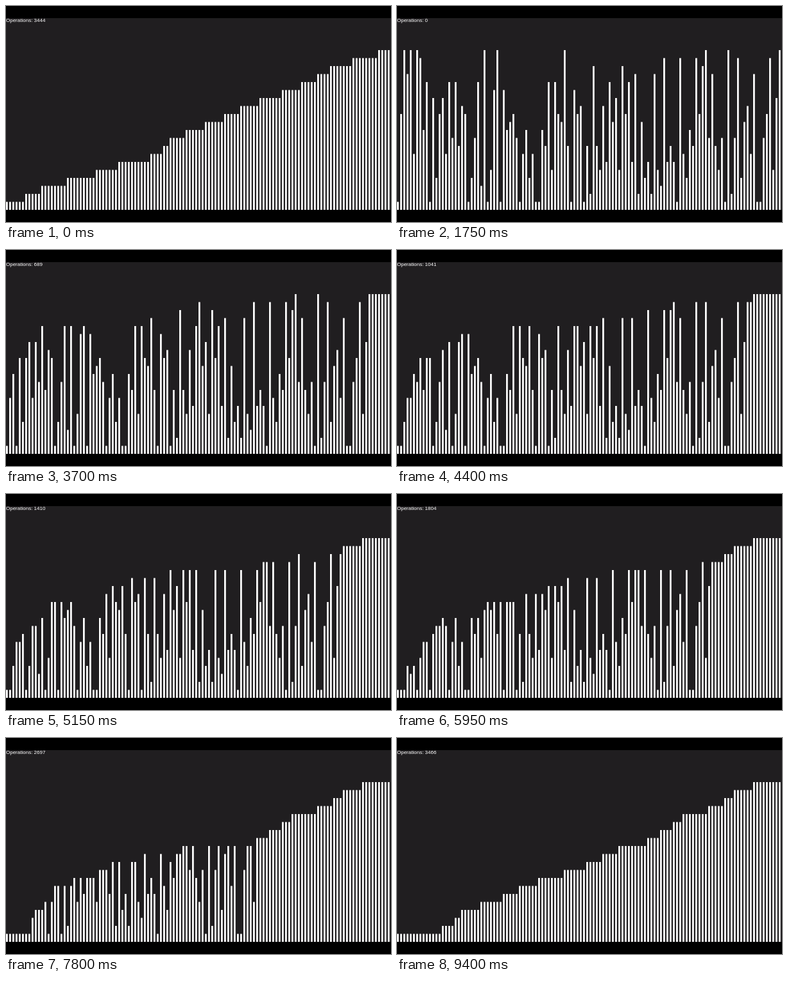
An HTML page with a canvas that plays this animation: 600 by 338 pixels, repeating every 10000 ms.

```html
<!DOCTYPE html>
<html lang="en">
<head>
<meta charset="utf-8">
<title>Bubble sort</title>
<style>
  html, body { margin: 0; height: 100%; overflow: hidden; background: #000; }
  canvas { display: block; }
</style>
</head>
<body>
<canvas id="stage" width="600" height="338"></canvas>
<script>
const ctx = document.getElementById('stage').getContext('2d');
const LOOP = 10000, STEP = 50, SHUFFLE = 1750;
const TOP = 19, BOTTOM = 319, PITCH = 5, BAR = 2.75, UNIT = 12.5;

// How many bars of each height 1..20 the previous, finished run holds.
const finishedCounts = [6, 5, 8, 9, 7, 10, 4, 2, 5, 6, 6, 5, 6, 7, 6, 5, 4, 7, 8, 4];
const finished = finishedCounts.flatMap((count, i) => Array(count).fill(i + 1));

const shuffled = [
  1, 12, 20, 17, 20, 7, 20, 19, 10, 16, 1, 14, 4, 12, 14, 7, 16, 9, 16, 8,
  13, 12, 1, 4, 9, 16, 3, 20, 1, 5, 15, 20, 1, 15, 10, 11, 12, 9, 1, 7,
  10, 4, 7, 1, 1, 10, 8, 16, 5, 16, 12, 11, 20, 8, 1, 15, 12, 13, 1, 8,
  2, 18, 8, 5, 13, 6, 16, 11, 14, 5, 18, 12, 16, 6, 17, 2, 11, 4, 6, 2,
  17, 5, 3, 19, 6, 8, 6, 1, 19, 7, 4, 10, 8, 19, 12, 18, 20, 9, 17, 8,
  5, 9, 1, 20, 2, 9, 19, 4, 11, 13, 7, 17, 1, 1, 9, 12, 19, 5, 14, 20
];

// Sorting pace: [time in ms, swaps done], linear in between.
const pace = [[2330, 0], [3000, 337], [4400, 1041], [5950, 1804],
  [6700, 2161], [7800, 2697], [9400, 3466]];

function swapsAt(time) {
  if (time <= pace[0][0]) return 0;
  const next = pace.findIndex(([t]) => t >= time);
  if (next < 0) return pace[pace.length - 1][1];
  const [t0, n0] = pace[next - 1], [t1, n1] = pace[next];
  return Math.round(n0 + (n1 - n0) * (time - t0) / (t1 - t0));
}

function bubbleSort(values, limit) {
  const a = values.slice();
  let swaps = 0;
  for (let end = a.length - 1; end > 0; end--) {
    for (let j = 0; j < end; j++) {
      if (swaps === limit) return a;
      if (a[j] > a[j + 1]) {
        [a[j], a[j + 1]] = [a[j + 1], a[j]];
        swaps++;
      }
    }
  }
  return a;
}

function draw(bars, operations) {
  ctx.fillStyle = '#000';
  ctx.fillRect(0, 0, 600, 338);
  ctx.fillStyle = '#201e20';
  ctx.fillRect(0, TOP, 600, BOTTOM - TOP);
  ctx.fillStyle = '#fff';
  bars.forEach((v, i) => ctx.fillRect(i * PITCH, BOTTOM - v * UNIT, BAR, v * UNIT));
  ctx.font = '8px "Liberation Sans", Arial, sans-serif';
  ctx.fillText('Operations: ' + operations, 0, 25);
}

const start = performance.now();
let shown = -1;

function tick() {
  const elapsed = (performance.now() - start) % LOOP;
  const time = Math.floor(elapsed / STEP) * STEP;
  if (time !== shown) {
    shown = time;
    if (time < SHUFFLE) {
      draw(finished, 3444);
    } else {
      const swaps = swapsAt(time);
      draw(bubbleSort(shuffled, swaps), swaps);
    }
  }
  requestAnimationFrame(tick);
}
tick();
</script>
</body>
</html>
```
